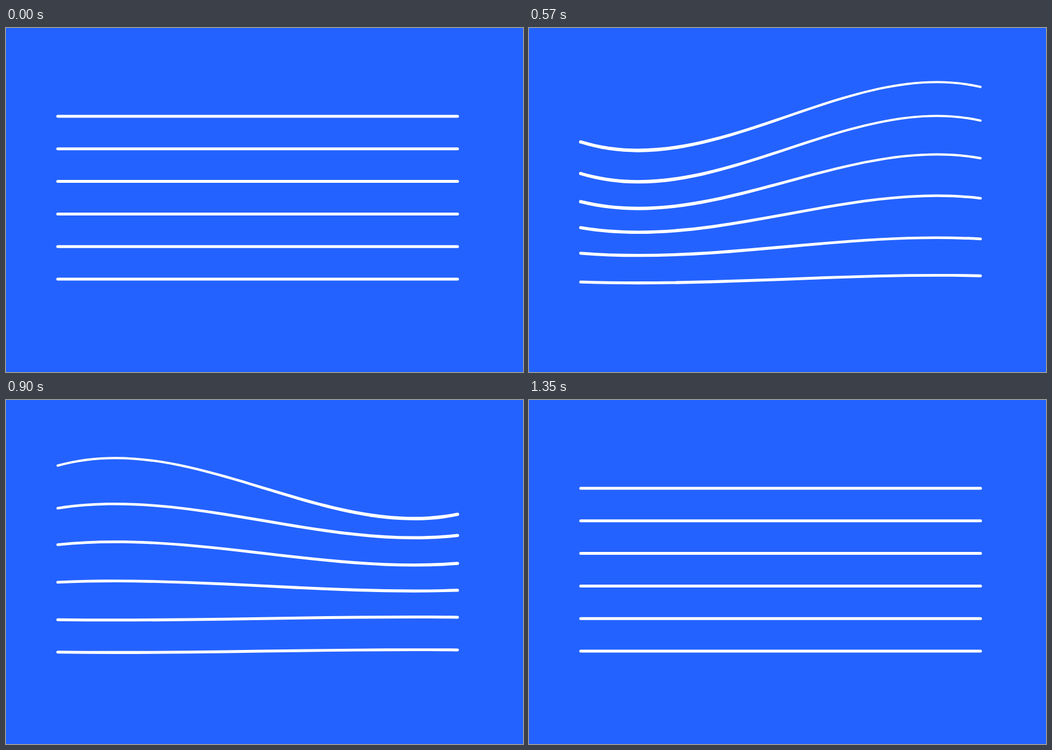
Recreate the animation shown at these times as an HTML page. Size 900x600 px, loop 1.8 s.

```html
<!DOCTYPE html>
<html lang="en">
<head>
<meta charset="utf-8">
<title>Strings</title>
<style>
  html, body { margin: 0; width: 100%; height: 100%; overflow: hidden; background: #2462ff; }
  svg { display: block; width: 900px; height: 600px; }
  path { fill: #fff; }
</style>
</head>
<body>
<svg id="stage" viewBox="0 0 900 600"></svg>
<script>
const LOOP = 1800, STEP = 30;
const LEFT = 90, RIGHT = 786, TOP = 154, GAP = 56.8;

// Each string swings linearly between these heights at these times.
const leadTimes = [300, 600, 900, 1200, 1350];
const times = [300, 557, 815, 1071, 1329];
const strings = [
  [66.2, -52.8, 7],
  [63, -48, 7.7],
  [51.5, -34.4, 8.2],
  [34.5, -17.2, 8.4],
  [16.3, 0, 7.9],
  [7, 0, 7.1]
].map((peaks, i) => ({
  y: TOP + GAP * i,
  times: i ? times : leadTimes,
  values: [0, ...peaks, 0],
  path: document.getElementById("stage").appendChild(
    document.createElementNS("http://www.w3.org/2000/svg", "path"))
}));

function heightAt({ times, values }, t) {
  const next = times.findIndex(k => k > t);
  if (next < 1) return 0;
  const from = times[next - 1];
  const p = (t - from) / (times[next] - from);
  return values[next - 1] + (values[next] - values[next - 1]) * p;
}

// Cubic wave with its trough at x = 190 and its crest at x = 710.
function wave(x) {
  const u = (x - 450) / 260;
  return { s: (u ** 3 - 3 * u) / 2, slope: 1.5 * (u * u - 1) / 260 };
}

const third = (RIGHT - LEFT) / 3;
const a = wave(LEFT), b = wave(RIGHT);
const ordinates = [a.s, a.s + a.slope * third, b.s - b.slope * third, b.s];

function outline(y, amp) {
  // Strings thicken as they swing down and thin as they swing up.
  const edge = side => ordinates.map((s, i) =>
    `${LEFT + third * i} ${(y + side * 2.5 + amp * s * (1 + side * 0.01)).toFixed(3)}`);
  const top = edge(-1), low = edge(1).reverse();
  const cap = s => { const r = 2.5 + amp * s * 0.01; return `A${r} ${r} 0 0 1 `; };
  return `M${top[0]}C${top.slice(1)}${cap(b.s)}${low[0]}C${low.slice(1)}${cap(a.s)}${top[0]}Z`;
}

function draw() {
  const t = Math.floor(performance.now() % LOOP / STEP) * STEP;
  for (const s of strings) s.path.setAttribute("d", outline(s.y, heightAt(s, t)));
  requestAnimationFrame(draw);
}
draw();
</script>
</body>
</html>
```
